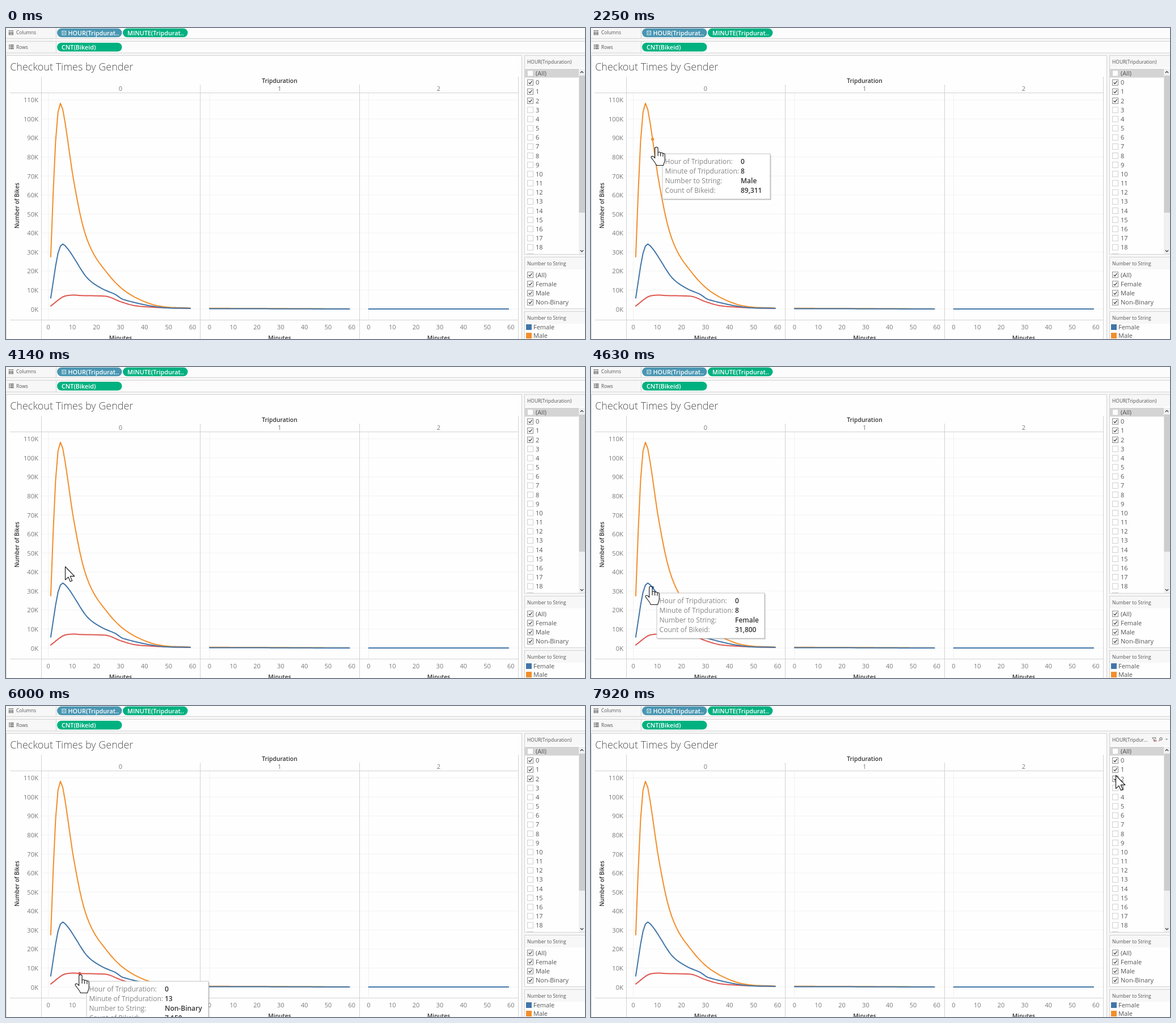
Write an HTML page that moves like this. It is 1021 px wide and 549 px high and loops after 7990 ms.

```html
<!DOCTYPE html>
<html lang="en">
<head>
<meta charset="utf-8">
<title>Checkout Times by Gender</title>
<style>
  html, body { margin: 0; width: 100%; height: 100%; overflow: hidden; background: #f7f7f7; }
  svg { display: block; font-family: "Open Sans", "Noto Sans", sans-serif; }
</style>
</head>
<body>
<svg id="stage" width="1021" height="549" viewBox="0 0 1021 549"></svg>
<script>
const LOOP = 7990, STEP = 70;
const ORANGE = '#f28e2b', BLUE = '#4175a8', RED = '#dd574f';
const EDGE = '#d2d2d2';

// ---- helpers -------------------------------------------------------
const rect = (x, y, w, h, fill, more = '') =>
  `<rect x="${x}" y="${y}" width="${w}" height="${h}" fill="${fill}" ${more}/>`;
const line = (x1, y1, x2, y2, color = EDGE, more = '') =>
  `<path d="M${x1} ${y1}L${x2} ${y2}" stroke="${color}" fill="none" ${more}/>`;
const text = (x, y, s, size, color = '#555', more = '') =>
  `<text x="${x}" y="${y}" font-size="${size}" fill="${color}" ${more}>${s}</text>`;
const range = (a, b, step = 1) =>
  Array.from({ length: Math.floor((b - a) / step) + 1 }, (_, i) => a + i * step);
const mix = (a, b, u) => a + (b - a) * u;
const MID = 'text-anchor="middle"', END = 'text-anchor="end"', SEMI = 'font-weight="600"';

// ---- data: thousands of bikes at a few minutes, smooth in between --
const male = [[1, 27.5], [2, 61], [3, 88], [4, 103.5], [5, 108.2], [6, 105], [8, 89.311],
  [10, 71.5], [14, 45.5], [18, 31], [24, 19.7], [30, 11.4], [37, 5.6], [46, 1.6], [59, .5]];
const female = [[1, 5.8], [3, 22.5], [4, 29.3], [5, 33.1], [6, 34.2], [8, 31.8], [10, 28.2],
  [16, 16.6], [22, 11], [28, 7.6], [31, 5.1], [46, 1], [59, .4]];
const other = [[1, 1.6], [5, 5.6], [7, 6.9], [11, 7.4], [13, 7.15], [22, 6.9], [25, 6.5],
  [30, 3.9], [36, 1.8], [45, .9], [59, .35]];

function valueAt(points, minute) {
  const last = points.length - 1;
  const i = Math.min(points.filter(p => p[0] <= minute).length - 1, last - 1);
  const slope = j => {
    const a = points[Math.max(j - 1, 0)], b = points[Math.min(j + 1, last)];
    return (b[1] - a[1]) / (b[0] - a[0]);
  };
  const [x0, y0] = points[i], [x1, y1] = points[i + 1];
  const w = x1 - x0, u = (minute - x0) / w;
  return mix(y0, y1, u * u * (3 - 2 * u)) +
    w * u * (1 - u) * ((1 - u) * slope(i) - u * slope(i + 1));
}

// ---- chart ---------------------------------------------------------
const panes = [
  { left: 62.5, right: 342.5, zero: 74.7, unit: 4.24 },
  { left: 342.5, right: 623.5, zero: 359, unit: 4.18 },
  { left: 623.5, right: 903.5, zero: 639.5, unit: 4.18 }
];
const px = (minute, pane = 0) => panes[pane].zero + minute * panes[pane].unit;
const py = k => 496.2 - k * 3.358;

function series(points, color, pane = 0) {
  const pts = range(points[0][0], 59).map(m =>
    px(m, pane).toFixed(1) + ',' + py(valueAt(points, m)).toFixed(1));
  return `<polyline points="${pts.join(' ')}" fill="none" stroke="${color}" stroke-width="2" stroke-linejoin="round" stroke-linecap="round"/>`;
}

function chart() {
  let s = rect(.5, 48.5, 909, 520, '#fefefe', `stroke="${EDGE}"`);
  s += text(7.2, 74.5, 'Checkout Times by Gender', 18, '#4e4e4e', 'font-weight="300"');
  s += text(482.5, 97, 'Tripduration', 10.4, '#333', MID + ' ' + SEMI);
  for (const k of range(0, 110, 10)) {
    s += line(63, py(k), 903, py(k), '#f3f3f3');
    s += text(57, py(k) + 4.4, k + 'K', 11.2, '#787878', END);
  }
  panes.forEach((p, i) => {
    const mid = (p.left + p.right) / 2 - .5;
    s += line(p.zero, 115, p.zero, 515, '#e4e4e4', 'stroke-dasharray="1 1"');
    s += line(p.left, i ? 100 : 86, p.left, 549);
    s += text(mid, 111, i, 11, '#787878', MID);
    s += text(mid, 550.7, 'Minutes', 10.3, '#333', MID + ' ' + SEMI);
    for (const m of range(0, 60, 10)) s += text(px(m, i), 531.5, m, 11, '#787878', MID);
  });
  s += line(903.5, 86, 903.5, 549) + line(7, 114.5, 903.5, 114.5) + line(7, 515.5, 903.5, 515.5);
  s += text(0, 0, 'Number of Bikes', 10, '#333',
    `${MID} ${SEMI} transform="translate(23.3 313.5) rotate(-90)"`);
  s += series(other, RED) + series(male, ORANGE) + series(female, BLUE);
  s += series([[0, .45], [59, .1]], ORANGE, 1) + series([[0, .25], [59, .05]], BLUE, 1);
  s += series([[0, .05], [59, .05]], BLUE, 2);
  return s;
}

// ---- shelves -------------------------------------------------------
const pill = (x, y, label, color, inset = 8) =>
  rect(x, y, 114.5, 15.5, color, 'rx="7.75"') +
  text(x + inset, y + 11.9, label, 10.8, '#fff', SEMI);

function shelves() {
  let s = '';
  for (const [y, h] of [[-1, 19.5], [23.5, 20.5]]) {
    s += rect(0, y, 1021, h, '#fcfcfc') + rect(0, y, 88, h, '#f7f7f7');
    s += line(88.5, y, 88.5, y + h) + line(0, y, 1021, y) + line(0, y + h, 1021, y + h);
  }
  for (const i of range(0, 2)) {
    s += rect(5 + i * 3, 4, 1.6, 2, '#555') + rect(5 + i * 3, 7, 1.6, 5.5, '#555');
    s += rect(5, 29.5 + i * 3, 1.8, 1.6, '#555') + rect(7.6, 29.5 + i * 3, 6, 1.6, '#555');
  }
  s += text(18, 11.2, 'Columns', 8.5) + text(18, 36.7, 'Rows', 8.5);
  s += pill(90, .8, 'HOUR(Tripdurat..', '#4996b2', 19.5);
  s += rect(99, 5.5, 6.5, 6.5, 'none', 'stroke="#fff" stroke-width=".9"') + line(100.5, 8.8, 104, 8.8, '#fff');
  s += pill(206, .8, 'MINUTE(Tripdurat..', '#00b180');
  s += pill(90, 26, 'CNT(Bikeid)', '#00b180');
  return s;
}

// ---- side cards ----------------------------------------------------
function check(y, label, on) {
  let s = rect(919.5, y - 5, 10, 10, '#fff', `stroke="${on ? '#8a8a8a' : '#cfcfcf'}"`);
  if (on) s += `<path d="M921.7 ${y}l2.1 2.3 3.8-4.8" fill="none" stroke="#333" stroke-width="1.2"/>`;
  return s + text(934, y + 4.1, label, 11);
}
const swatch = (y, label, color) => rect(917, y, 10, 10, color) + text(930, y + 9.2, label, 11);
const card = (y, h, title = '') =>
  rect(914.5, y, 120, h, '#fefefe', `stroke="${EDGE}"`) +
  rect(915, y + .5, 106, 21, '#f7f7f7') + text(919, y + 14, title, 8.5);
const chevron = (y, d) =>
  `<path d="M1012.8 ${y + d}l2.7 ${-2 * d} 2.7 ${2 * d}" fill="none" stroke="#444" stroke-width="1.3"/>`;

function sidebar() {
  let s = card(48.5, 351) + rect(915, 72, 95, 15.5, '#d4d4d4');
  s += '<clipPath id="list"><path d="M915 72H1010V399H915Z"/></clipPath><g clip-path="url(#list)">';
  s += check(80, '(All)', false);
  for (const i of range(0, 19)) s += check(96.2 + i * 16.16, i, i < 3);
  s += '</g>' + rect(1010, 72, 11, 327, '#f0f0f0') + rect(1010.5, 84, 10.5, 242, '#cdcdcd');
  s += chevron(78, 1.3) + chevron(393.5, -1.3);
  s += card(404.5, 91, 'Number to String');
  ['(All)', 'Female', 'Male', 'Non-Binary'].forEach((n, i) => s += check(435.7 + i * 16.15, n, true));
  s += card(500.5, 80, 'Number to String');
  return s + swatch(523, 'Female', BLUE) + swatch(538, 'Male', ORANGE);
}

const plainHead = text(919, 62.6, 'HOUR(Tripduration)', 8.5);
const hoverHead = text(919, 62.6, 'HOUR(Tripdur...', 8.5) +
  '<path d="M989.5 56h7l-2.7 3.2v3.3l-1.6-1v-2.3z" fill="none" stroke="#666" stroke-width=".9"/>' +
  '<path d="M994.3 60l3 3m0-3l-3 3" stroke="#d33" stroke-width="1"/>' +
  '<circle cx="1005" cy="58" r="2.2" fill="none" stroke="#555"/>' + line(1003.4, 59.7, 1001, 62.2, '#555') +
  '<path d="M1012.5 57.7h5l-2.5 2.6z" fill="#999"/>';

// ---- pointer -------------------------------------------------------
const shapes = {
  arrow: 'M.5 .5V23.8L5.8 18.8 9.3 26.8 12.7 25.3 9.2 17.4H16.8Z',
  hand: 'M-2.8 18V2a2.7 2.7 0 0 1 5.4 0V10c0-2.8 4.6-2.8 4.6 .6c0-2.6 4.2-2 4.2 1c0-2.2 3.4-1.6 3.4 1' +
    'V21.5c0 4-2 6-2.6 10H-.2C-1.5 27-6.5 22-9.2 18c-1.2-3 3.2-4.6 6.4 .6zM2.6 10v5M7.2 11v4.5M11.4 12v4',
  resize: 'M-15.5 0L-9-6.3V-1.6H9V-6.3L15.5 0 9 6.3V1.6H-9V6.3Z'
};

// Each leg glides from the previous stop: start time, steps, stop
const entry = [980, 540];
const legs = [
  [660, 4, [600, 467]], [1150, 2, [286, 251]],
  [1480, 4, [140, 211]], [1760, 3, [115.5, 211]],
  [3790, 6, [104, 352]], [4210, 4, [105.5, 388]],
  [5160, 5, [122, 441]], [5510, 5, [131.5, 475]],
  [6530, 3, [820, 264]], [6940, 1, [910, 189.5]],
  [7010, 4, [944, 80]], [7290, 7, [928, 95]], [7780, 3, [925, 122]]
];

const hovers = [
  { from: 2040, to: 3790, minute: 8, data: male, name: 'Male', color: ORANGE, w: 190 },
  { from: 4420, to: 5160, minute: 8, data: female, name: 'Female', color: BLUE, w: 190 },
  { from: 5790, to: 6530, minute: 13, data: other, name: 'Non-Binary', color: RED, w: 215 }
];

const stepsSince = (t, start) => Math.floor((t - start) / STEP) + 1;

function pointerAt(t) {
  const i = legs.filter(leg => leg[0] <= t).length - 1;
  if (i < 0) return null;
  const [start, steps, stop] = legs[i];
  const from = i ? legs[i - 1][2] : entry;
  const u = Math.min(1, stepsSince(t, start) / steps);
  const eased = 1 - (1 - u) ** 1.6;
  return stop.map((v, axis) => mix(from[axis], v, eased));
}

function tooltip(h, x, y, alpha) {
  const count = Math.round(valueAt(h.data, h.minute) * 1000).toLocaleString('en-US');
  const rows = [['Hour of Tripduration:', 0], ['Minute of Tripduration:', h.minute],
    ['Number to String:', h.name], ['Count of Bikeid:', count]];
  let s = `<g opacity="${alpha}" transform="translate(${x} ${y})">`;
  s += rect(2, 2, h.w, 80, '#000', 'opacity=".12" rx="1"') + rect(1, 1, h.w, 80, '#000', 'opacity=".15"');
  s += rect(0, 0, h.w, 80, '#fff', 'stroke="#c4c4c4"');
  rows.forEach(([label, value], i) => {
    const base = 18.4 + i * 16.8;
    s += text(4.5, base, label, 12.1, '#868686') + text(138, base, value, 12, '#333', SEMI);
  });
  return s + '</g>';
}

function overlay(t) {
  let s = t >= 7010 ? hoverHead : plainHead;
  const at = pointerAt(t);
  if (!at) return s;
  const [x, y] = at;
  const h = hovers.find(v => t >= v.from && t < v.to);
  if (h) {
    s += `<circle cx="${px(h.minute)}" cy="${py(valueAt(h.data, h.minute))}" r="2.6" fill="${h.color}"/>`;
    s += tooltip(h, x + 10.5, y + 11, Math.min(1, stepsSince(t, h.from) / 4));
  }
  const kind = h ? 'hand' : t >= 6940 && t < 7010 ? 'resize' : 'arrow';
  return s + `<path d="${shapes[kind]}" transform="translate(${x} ${y})" fill="#fff" stroke="#111" stroke-width="1.1" stroke-linejoin="round"/>`;
}

// ---- play ----------------------------------------------------------
const stage = document.getElementById('stage');
stage.innerHTML = shelves() + chart() + sidebar() + '<g id="live"></g>';
const live = document.getElementById('live');
const t0 = performance.now();
let last = '';

function frame() {
  const next = overlay((performance.now() - t0) % LOOP);
  if (next !== last) live.innerHTML = last = next;
  requestAnimationFrame(frame);
}
frame();
</script>
</body>
</html>
```
